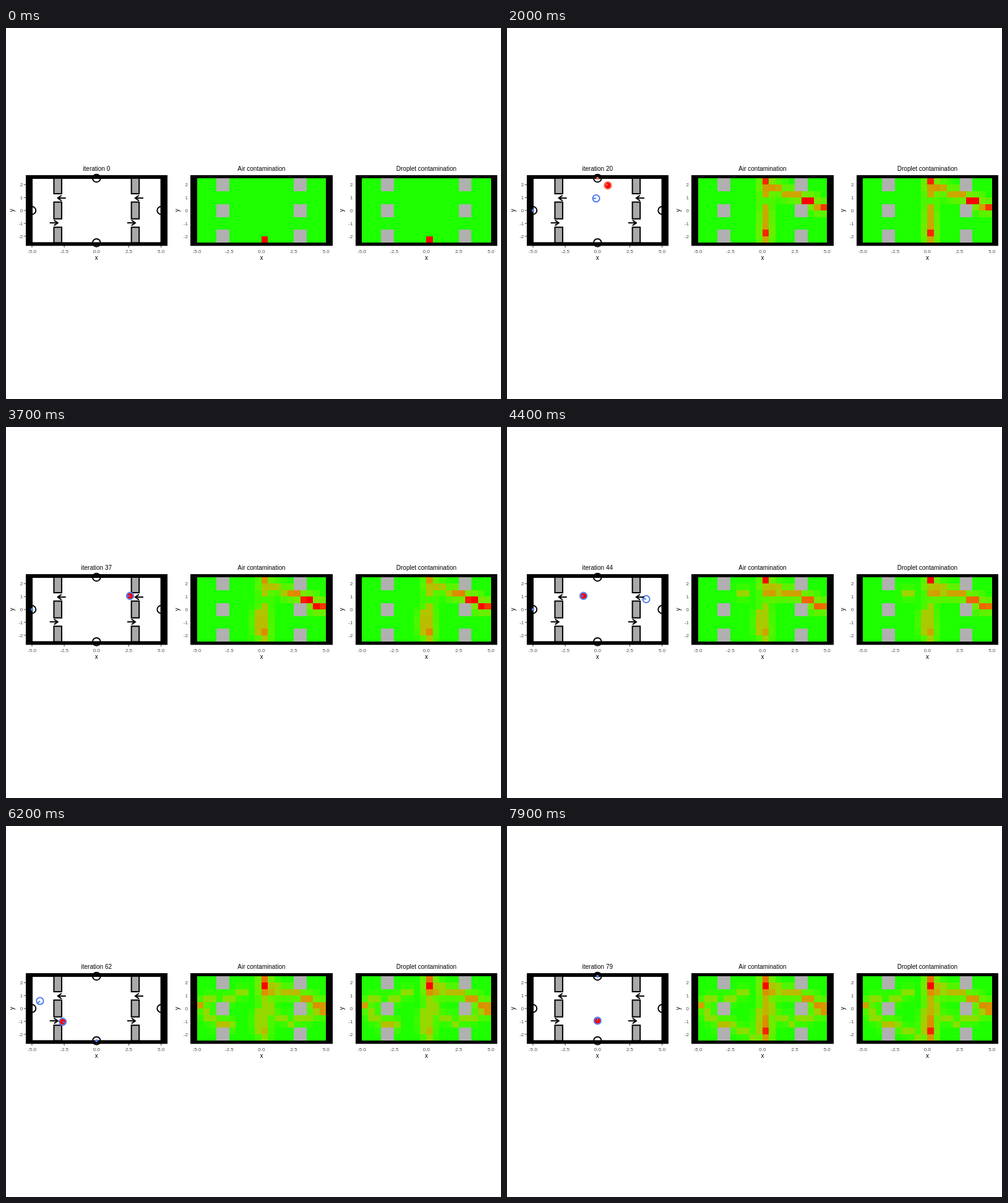
Write an HTML page with a canvas that moves like this. It is 800 by 600 pixels and loops after 8000 ms.

```html
<!DOCTYPE html>
<html>
<head>
<meta charset="utf-8">
<style>
html, body { margin: 0; width: 100%; height: 100%; overflow: hidden; background: #fff; }
canvas { display: block; }
</style>
</head>
<body>
<canvas id="stage" width="800" height="600"></canvas>
<script>
const g = document.getElementById('stage').getContext('2d');
const UNIT = 20.87, MID_Y = 295.1, STEPS = 80, COLS = 20, ROWS = 10;
const ROOM_X = 146.3, AIR_X = 412.9, DROP_X = 679.4;
const BLUE = '#4f7df0', CORAL = '#ee6a50';

// Doors and gaps between the shelves
const pt = (x, y) => ({ x, y });
const W = pt(-5, 0), E = pt(5, 0), N = pt(0, 2.5), S = pt(0, -2.5);
const NE = pt(3, .95), NW = pt(-3, .95), SE = pt(3, -.95);

const walkers = [], deposits = [];

function at(path, t) {
  for (let i = 2; i < path.length; i += 2) {
    const t0 = path[i - 2], a = path[i - 1], t1 = path[i], b = path[i + 1];
    if (t <= t1) {
      const k = (t - t0) / (t1 - t0);
      return pt(a.x + (b.x - a.x) * k, a.y + (b.y - a.y) * k);
    }
  }
  return path[path.length - 1];
}

const linger = (t, x, y, n = 1) => deposits.push({ t, x, y, n });

// path: step, place, step, place ...; particles land one step ahead
function walk(color, kind, ...path) {
  const start = path[0], end = path[path.length - 2];
  walkers.push({ color, kind, path, start, end });
  if (kind === 'well') return;
  for (let t = start; t < Math.min(end - 1, STEPS); t++) {
    const p = at(path, t), q = at(path, t + 1);
    const moves = p.x !== q.x || p.y !== q.y;
    if (moves && (kind === 'sick' || q.y < -.3)) linger(t, q.x || .1, q.y);
  }
}

walk(CORAL, 'sick', 0, S, 1, pt(0, -2.3), 2, pt(0, -1.9), 3, pt(0, -1.6), 7, pt(0, .4), 8, pt(0, 1.1), 10, pt(0, 2.3), 11, N);
walk(BLUE, 'well', 8, E, 12, pt(3.2, .92), 27, NW, 29, pt(-4.31, .64), 30, W);
walk(CORAL, 'sick', 10, E, 12, pt(4.27, .15), 13, pt(3.7, .7), 15, NE, 17, pt(2, 1.1), 22, N);
walk(CORAL, 'carrier', 11, N, 23, N, 29, pt(-.02, -.4), 33, S);
walk(BLUE, 'sick', 32, E, 33, pt(4.4, .2), 34, pt(4.1, .3), 35, pt(3.7, .7), 36, NE, 37, pt(2.6, 1.05),
  43, pt(.1, 1.05), 44, pt(-1.09, 1.05), 47, NW, 49, pt(-4.2, .6), 51, W);
walk(BLUE, 'well', 41, E, 44, pt(3.77, .8), 46, NE, 55, pt(-.85, 1.02), 59, NW, 62, pt(-4.38, .58), 64, W);
walk(BLUE, 'sick', 45, N, 46, pt(.1, 1.9), 48, pt(.1, 1.6), 52, pt(.7, -.4), 55, pt(2.25, -1), 57, SE, 61, E);
walk(BLUE, 'sick', 5, W, 54, W, 55, pt(-4.68, .02), 59, pt(-3.5, -1.02), 62, pt(-2.62, -1.03), 67, S);
walk(BLUE, 'sick', 55, S, 71, S, 73, pt(0, -2.2), 79, pt(0, -.95), 85, pt(0, .3));
walk(BLUE, 'well', 53, E, 57, E);
walk(BLUE, 'well', 74, N, 80, N);

// Places where someone stands for a while
linger(9, 4.7, .2);
linger(13, 3.7, .7);
linger(27, 4.7, .2);
linger(43, .1, 2.2, 2);
linger(47, .1, 1.7);
linger(54, -4.7, .2);
linger(60, 4.7, -.2, 2);
for (let i = 0; i < 3; i++) linger(76 + i, .1, i / 2 - .3);

const clamp = (v, lo, hi) => Math.min(hi, Math.max(lo, v));

function heatAt(step) {
  const heat = new Float32Array(COLS * ROWS);
  for (const d of deposits) {
    if (d.t > step) continue;
    const col = clamp(Math.floor((d.x + 5) * 2), 0, COLS - 1);
    const row = clamp(Math.floor((2.5 - d.y) * 2), 0, ROWS - 1);
    for (let r = row - 1; r <= row + 1; r++) for (let c = col - 1; c <= col + 1; c++) {
      if (c < 0 || r < 0 || c >= COLS || r >= ROWS) continue;
      // the very first deposit has not spread yet
      const spread = step ? .06 : 0;
      heat[r * COLS + c] += d.n * (r === row && c === col ? 1 : spread);
    }
  }
  return heat;
}

// Green to red through CIE Lab
function shade(k) {
  const f = (87.73 - 34.49 * k + 16) / 116;
  const cube = v => v > .2069 ? v ** 3 : (v - .1379) / 7.787;
  const X = .9505 * cube(f + (-86.18 + 166.27 * k) / 500);
  const Y = cube(f);
  const Z = 1.089 * cube(f - (83.18 - 15.98 * k) / 200);
  const gamma = v => {
    v = clamp(v, 0, 1);
    return Math.round(255 * (v > .0031 ? 1.055 * v ** (1 / 2.4) - .055 : 12.92 * v));
  };
  const red = Math.max(30, gamma(3.2406 * X - 1.5372 * Y - .4986 * Z));
  const green = gamma(-.9689 * X + 1.8758 * Y + .0415 * Z);
  const blue = gamma(.0557 * X - .204 * Y + 1.057 * Z);
  return `rgb(${red},${green},${blue})`;
}

const px = x => ROOM_X + x * UNIT;
const py = y => MID_Y - y * UNIT;

function box(x0, y0, x1, y1, fill) {
  g.fillStyle = fill;
  g.fillRect(x0, y0, x1 - x0, y1 - y0);
}

function line(...pts) {
  g.beginPath();
  for (let i = 0; i < pts.length; i += 2) g.lineTo(pts[i], pts[i + 1]);
  g.stroke();
}

function disc(x, y, r, fill) {
  g.beginPath();
  g.arc(x, y, r, 0, 7);
  if (fill) {
    g.fillStyle = fill;
    g.fill();
  } else g.stroke();
}

function text(s, x, y, size, align = 'center', fill = '#000') {
  g.font = size + 'px "Liberation Sans", Arial, sans-serif';
  g.textAlign = align;
  g.fillStyle = fill;
  g.fillText(s, x, y);
}

function axes(cx, title, ticks) {
  text(title, cx, 231, 10);
  text('x', cx, 375, 10);
  g.save();
  g.translate(cx - 133, MID_Y);
  g.rotate(-Math.PI / 2);
  text('y', 0, 0, 10);
  g.restore();
  g.strokeStyle = '#333';
  g.lineWidth = 1;
  for (let v = -2; v <= 2; v++) {
    const x = cx + v * 2.5 * UNIT, y = py(v);
    text((v * 2.5).toFixed(1), x, 363.5, 8, 'center', '#4d4d4d');
    text(v, cx - 119, y + 3, 8, 'right', '#4d4d4d');
    if (ticks) {
      line(x, 352, x, 355);
      line(cx - 117.5, y, cx - 114.5, y);
    }
  }
}

function frame(cx) {
  box(Math.round(cx - 114.6), 238, Math.round(cx + 114.8), 352.3, '#000');
}

function arrow(x, y, dir) {
  const tip = px(x), a = py(y);
  line(tip - dir * 13, a, tip, a);
  line(tip - dir * 6, a - 4.3, tip, a, tip - dir * 6, a + 4.3);
}

function drawWalker({ color, kind, path, start, end }, t) {
  if (!t || t < start || t > end) return;
  const p = at(path, t), q = at(path, t + 1), x = px(p.x), y = py(p.y);
  if (Math.abs(p.x) > 4.95 || Math.abs(p.y) > 2.45) {
    disc(x, y, 2.2, color);
    return;
  }
  const angle = Math.atan2(p.y - q.y, q.x - p.x);
  if (kind === 'sick') disc(x, y, 4.8, '#f00');
  g.strokeStyle = color;
  g.lineWidth = 2;
  disc(x, y, 5.6);
  line(x, y, x + 5.6 * Math.cos(angle), y + 5.6 * Math.sin(angle));
}

function shelf(x, top, low) {
  const w = .6 * UNIT, h = (top - low) * UNIT;
  g.fillStyle = '#a9a9a9';
  g.fillRect(px(x - .3), py(top), w, h);
  g.strokeRect(px(x - .3), py(top), w, h);
}

function room(step) {
  frame(ROOM_X);
  box(43, 244, 249.6, 346.4, '#fff');
  g.strokeStyle = '#000';
  g.lineWidth = 2;
  for (const x of [-3, 3]) {
    shelf(x, 2.5, 1.3);
    shelf(x, .65, -.65);
    shelf(x, -1.3, -2.5);
  }
  for (const door of [W, E, N, S]) disc(px(door.x), py(door.y), 6.3);
  for (const w of walkers) drawWalker(w, step);
  g.strokeStyle = '#000';
  g.lineWidth = 2;
  for (const x of [-3, 3]) {
    arrow(x, .96, -1);
    arrow(x, -.96, 1);
  }
  axes(ROOM_X, 'iteration ' + step, true);
}

function map(cx, title, heat) {
  const max = Math.max(...heat);
  const ex = c => Math.round(cx + (c - 10) * UNIT / 2);
  const ey = r => Math.round(MID_Y + (r - 5) * UNIT / 2);
  frame(cx);
  heat.forEach((v, i) => {
    const c = i % COLS, r = Math.floor(i / COLS);
    box(ex(c), ey(r), ex(c + 1), ey(r + 1), shade(v / max));
  });
  for (const c of [3, 15]) for (const r of [0, 4, 8])
    box(ex(c), ey(r), ex(c + 2), ey(r + 2), '#b0b0b0');
  axes(cx, title, false);
}

let shown = -1;
function draw(now) {
  const step = Math.floor(now / 100) % STEPS;
  if (step !== shown) {
    shown = step;
    box(0, 0, 800, 600, '#fff');
    const heat = heatAt(step);
    room(step);
    map(AIR_X, 'Air contamination', heat);
    map(DROP_X, 'Droplet contamination', heat);
  }
  requestAnimationFrame(draw);
}
draw(0);
</script>
</body>
</html>
```
